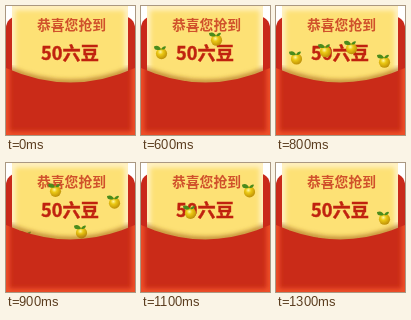
Recreate the animation shown at these times as an HTML page. Size 129 by 129 pixels, loop 1.4 s.

```html
<!DOCTYPE html>
<html lang="zh">
<head>
<meta charset="utf-8">
<style>
  html, body { margin: 0; width: 100%; height: 100%; overflow: hidden; background: #fff; }
  svg { display: block; width: 100vw; height: 100vh; }
  text { font-family: "Noto Sans CJK SC", "Noto Sans CJK", sans-serif; font-weight: 700; text-anchor: middle; }
</style>
</head>
<body>
<svg viewBox="0 0 129 129">
  <defs>
    <radialGradient id="peel" cx=".4" cy=".35" r=".7">
      <stop offset="0" stop-color="#fff6a0"/>
      <stop offset=".35" stop-color="#ecc914"/>
      <stop offset="1" stop-color="#b98a06"/>
    </radialGradient>
    <filter id="soft" x="-20%" y="-20%" width="140%" height="140%"><feGaussianBlur stdDeviation="2.5"/></filter>
    <path id="pocket" d="M0 62Q64.5 91 129 62V129H0Z"/>
    <clipPath id="inPocket"><use href="#pocket"/></clipPath>
    <clipPath id="inCard"><rect id="card" x="6" width="116" height="90"/></clipPath>
    <g id="fruit">
      <circle cx=".5" cy="1.2" r="5.6" fill="url(#peel)"/>
      <path d="M0-3Q-7-1-7-6Q-2-8 0-3Q2-7 5-6Q4-2 0-3" fill="#4a8b1c"/>
    </g>
  </defs>
  <rect y="10" width="129" height="119" rx="12" fill="#c9291a"/>
  <g clip-path="url(#inCard)">
    <rect x="6" width="116" height="90" fill="#fde175"/>
    <rect x="6" y="1" width="116" height="100" fill="none" stroke="#fff3cf" stroke-width="6" filter="url(#soft)"/>
    <text x="65.5" y="24" font-size="13.8" fill="#d0512b">恭喜您抢到</text>
    <text x="64" y="53.5" font-size="18.2" fill="#c0220f" stroke="#c0220f" stroke-width=".4">50六豆</text>
    <g id="fruits"></g>
    <path d="M0 62Q64.5 91 129 62" fill="none" stroke="#a8681c" stroke-width="4" filter="url(#soft)"/>
  </g>
  <use href="#pocket" fill="#ca2b18"/>
  <g clip-path="url(#inPocket)">
    <path d="M0 40V129H129V40" fill="none" stroke="#f4552c" stroke-width="6" filter="url(#soft)"/>
  </g>
</svg>
<script>
  const LOOP = 1400, STEP = 100;
  // each fruit is tossed out of the pocket and drops back in
  const tosses = [
    { x: 20, top: 37, peak: 685, pull: 12 },
    { x: 75, top: 23, peak: 680, pull: 14 },
    { x: 49, top: 24, peak: 940, pull: 12.4 },
    { x: 108, top: 25, peak: 1050, pull: 7.6 }
  ];
  const layer = document.getElementById("fruits");
  for (const toss of tosses) {
    toss.node = document.createElementNS("http://www.w3.org/2000/svg", "use");
    toss.node.setAttribute("href", "#fruit");
    layer.append(toss.node);
  }

  function draw(now) {
    const time = Math.floor(now % LOOP / STEP) * STEP;
    for (const { x, top, peak, pull, node } of tosses) {
      const y = top + pull * (Math.abs(time - peak) / STEP) ** 1.5;
      node.setAttribute("transform", `translate(${x} ${y})`);
    }
  }

  const origin = performance.now();
  function tick() {
    draw(performance.now() - origin);
    requestAnimationFrame(tick);
  }
  tick();
</script>
</body>
</html>
```
